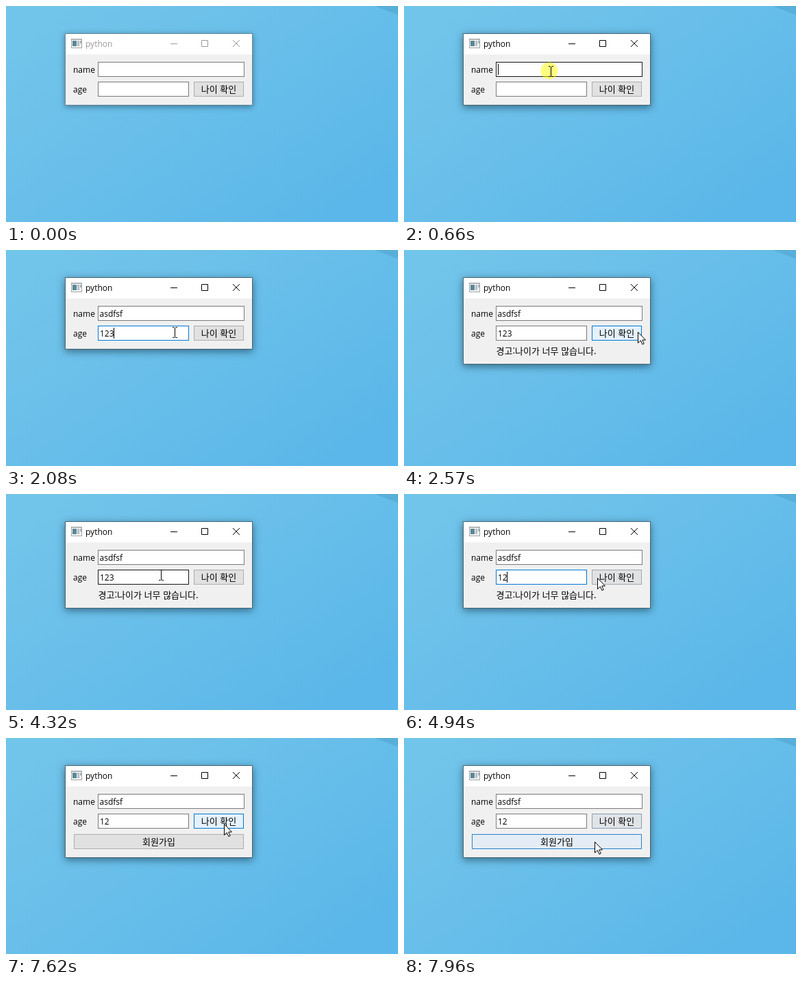
An HTML page for the animation above (8000 ms loop, 572 by 317 pixels).

```html
<!DOCTYPE html>
<html lang="ko">
<head>
<meta charset="utf-8">
<title>python</title>
<style>
  html, body { margin: 0; width: 100%; height: 100%; overflow: hidden; background: #66beea; }
  svg { display: block; width: 100vw; height: 100vh; }
  text { font: 12px "Open Sans", "Noto Sans", sans-serif; fill: #000; white-space: pre; }
  .ko { font: 13px "Noto Sans CJK KR", "Noto Sans CJK", sans-serif; }
  .mid { text-anchor: middle; }
  .frame { fill: #f0f0f0; stroke: #4b6572; filter: drop-shadow(0 3px 6px rgba(0, 20, 35, .5)); }
  .controls { fill: none; stroke: #000; }
  .inactive .frame { stroke: #668798; filter: drop-shadow(0 2px 4px rgba(0, 20, 35, .42)); }
  .inactive .controls { stroke: #999; }
  .inactive .title { fill: #999; }
  .field { fill: #fff; stroke: #7a7a7a; }
  .field.hover { stroke: #171717; }
  .field.focus { stroke: #0078d7; }
  .button { fill: #e1e1e1; stroke: #adadad; }
  .hot { fill: #e5f1fb; stroke: #0078d7; }
  .hot.pressed { fill: #cce4f7; stroke: #005499; }
  .caret { stroke: #000; }
</style>
</head>
<body>
<svg viewBox="0 0 572 317" preserveAspectRatio="none">
  <defs>
    <linearGradient id="sky" gradientUnits="userSpaceOnUse" x1="130" y1="-30" x2="400" y2="360">
      <stop offset="0" stop-color="#73c5ea"/>
      <stop offset="1" stop-color="#5bb7e9"/>
    </linearGradient>
  </defs>
  <rect width="572" height="317" fill="url(#sky)"/>
  <path d="M0 0H205L0 148Z" fill="#6cc0e6" opacity=".25"/>
  <path d="M538 0H572V13Z" fill="#58afd9"/>

  <g id="win">
    <rect id="frame" class="frame" x="86.5" y="40.5" width="273" height="105"/>
    <rect x="87" y="41" width="272" height="30" fill="#fff"/>
    <rect x="95.500" y="48.500" width="15" height="13" fill="#f4f4f4" stroke="#a0a4a6"/>
    <path d="M96 49.500H110" stroke="#c3c8ca"/>
    <path d="M97 51h6v8h-6z" fill="#5b8795"/>
    <path d="M104 51h3v8h-3z" fill="#b4c0c8"/>
    <path d="M108 51h2v4h-2z" fill="#9fb3bd"/>
    <text class="title" x="116" y="60">python</text>
    <path class="controls" d="M240 55.500h10M285.500 50.500h9v9h-9zM331 50l10 10M341 50l-10 10"/>

    <text x="98" y="98">name</text>
    <text x="98" y="127">age</text>
    <rect id="nameBox" class="field" x="134.500" y="82.500" width="213" height="21"/>
    <rect id="ageBox" class="field" x="134.500" y="111.500" width="132" height="21"/>
    <text id="nameText" x="136.500" y="98"></text>
    <text id="ageText" x="137" y="127"></text>
    <path id="nameCaret" class="caret" d="M137.500 85v16"/>
    <path id="ageCaret" class="caret" d="M137.500 114v16"/>

    <rect class="button" x="274.500" y="111.500" width="72" height="21"/>
    <rect id="checkHot" class="hot" x="274.500" y="111.500" width="72" height="21"/>
    <text class="ko mid" x="310.500" y="127">나이 확인</text>

    <text id="warning" class="ko" x="134.500" y="153">경고:나이가 너무 많습니다.</text>
    <g id="join">
      <rect class="button" x="99.500" y="141.500" width="247" height="21"/>
      <rect id="joinHot" class="hot" x="99.500" y="141.500" width="247" height="21"/>
      <text class="ko mid" x="223" y="157">회원가입</text>
    </g>
  </g>

  <g id="pointer">
    <circle id="click" cx="-2" cy="-1" r="12.500" fill="#ff0" opacity=".5"/>
    <path id="beam" d="M-3.500 -7.500H-1M1 -7.500H3.500M0 -7V7.500M-3.500 7.500H-1M1 7.500H3.500" fill="none" stroke="#000" transform="translate(.5)"/>
    <path id="arrow" d="M.5 .5V16.500L4.300 12.900L6.900 18.500L9.200 17.500L6.700 12H11.500Z" fill="#fff" stroke="#000"/>
  </g>
</svg>
<script>
const LOOP = 8000, STEP = 65;
const bursts = [0, 70, 990, 1800, 3760, 4590, 7620];
const clicks = [[600, 720], [1575, 1660], [2320, 2450], [4385, 4455], [5175, 5305]];
// time, x, y, vertical bow of the move that ends here
const path = [
  [70, 465, 246, 0], [525, 214, 96, 0],
  [1300, 214, 96, 0], [1445, 213, 121, 0],
  [1930, 213, 121, 0], [2320, 341, 120, 0],
  [3752, 341, 120, 0], [4280, 226, 119, -6],
  [4655, 226, 119, 0], [5110, 319, 125, 0],
  [7590, 319, 125, 0], [7945, 278, 152, 0]
];

const $ = id => document.getElementById(id);
const clamp = v => Math.max(0, Math.min(1, v));
const within = (t, a, b) => t >= a && t < b;
const show = (id, on) => $(id).style.display = on ? "" : "none";
const inside = (p, x, y, w, h) => within(p.x, x, x + w) && within(p.y, y, y + h);
const fade = (t, on, off) => clamp((t - on) / 200) * clamp(1 - (t - off) / 300);

// The picture advances in short held steps within each burst.
function hold(t) {
  const start = bursts.filter(b => b <= t).pop();
  return start + Math.floor((t - start) / STEP) * STEP;
}

function pointerAt(t) {
  const i = path.findIndex(k => k[0] > t);
  if (i < 1) {
    const k = i ? path[path.length - 1] : path[0];
    return { x: k[1], y: k[2] };
  }
  const a = path[i - 1], b = path[i];
  const u = (t - a[0]) / (b[0] - a[0]), e = u * u * (3 - 2 * u);
  return {
    x: Math.round(a[1] + (b[1] - a[1]) * e),
    y: Math.round(a[2] + (b[2] - a[2]) * e + b[3] * 4 * e * (1 - e))
  };
}

function drawField(name, text, hover, blue, caret) {
  const box = $(name + "Box"), label = $(name + "Text");
  box.classList.toggle("hover", hover);
  box.classList.toggle("focus", blue);
  if (label.textContent !== text) label.textContent = text;
  show(name + "Caret", caret);
  const dx = text ? Math.round(label.getComputedTextLength()) - 1 : 0;
  $(name + "Caret").setAttribute("transform", `translate(${dx})`);
}

function draw(now) {
  const t = now % LOOP, q = hold(t), p = pointerAt(q);
  const warned = within(t, 2450, 5240), joined = t >= 5240;
  const clicking = clicks.some(([a, b]) => within(t, a, b));
  const overName = inside(p, 134, 82, 214, 22);
  const overAge = inside(p, 134, 111, 133, 22);
  const beam = overName || overAge || inside(p, 134, 104, 133, 7);

  $("win").classList.toggle("inactive", t < 600);
  $("frame").setAttribute("height", joined ? 135 : warned ? 127 : 105);
  show("warning", warned);
  show("join", joined);

  const typed = Math.max(0, Math.floor((t - 990) / STEP) + 1);
  const digits = t < 1800 ? 0 : t < 1860 ? 1 : t < 1930 || t >= 4590 ? 2 : 3;
  const ageFocus = within(t, 1600, 2330) || within(t, 4390, 5180);
  const ageBlue = within(t, 1660, 2330) || within(t, 4455, 5180);
  drawField("name", "asdfsf".slice(0, typed), overName && t >= 70,
    within(t, 790, 1600), within(t, 600, 1600));
  drawField("age", "123".slice(0, digits), overAge, ageBlue, ageFocus);

  $("checkHot").style.opacity = Math.max(fade(q, 2150, 3900), fade(q, 4900, 7718));
  $("checkHot").classList.toggle("pressed", clicking && p.x > 274);
  $("joinHot").style.opacity = fade(q, 7790, LOOP);

  show("pointer", t >= 70);
  show("click", clicking);
  show("beam", beam);
  show("arrow", !beam);
  $("pointer").setAttribute("transform", `translate(${p.x} ${p.y})`);
  requestAnimationFrame(draw);
}
draw(performance.now());
</script>
</body>
</html>
```
